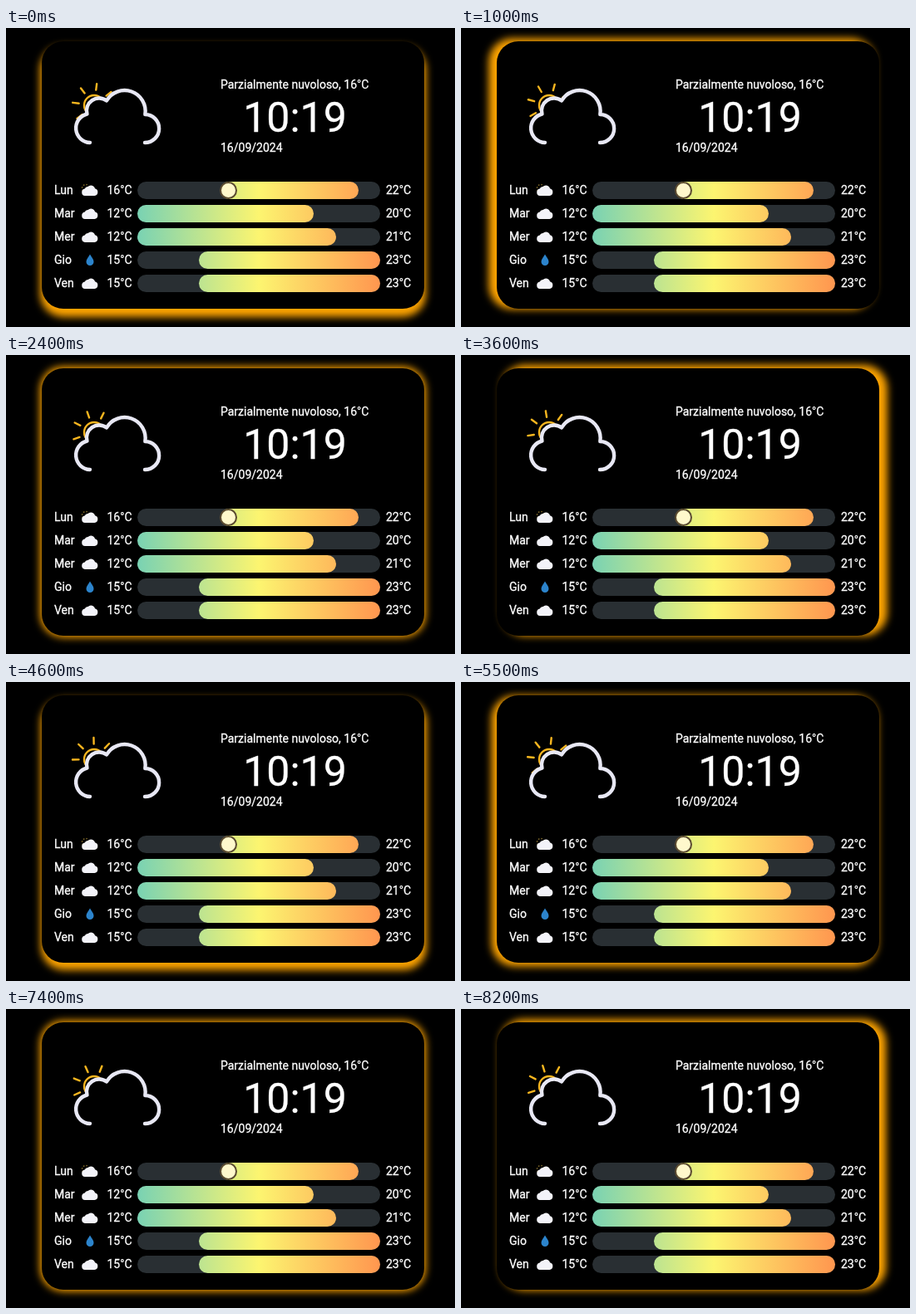
Animation, 540 px wide and 360 px high, one loop 8.3 s. Source, as an HTML page:

```html
<!DOCTYPE html>
<html lang="it">
<head>
<meta charset="utf-8">
<style>
  html, body { margin: 0; width: 100%; height: 100%; overflow: hidden; background: #000; }
  #card { position: absolute; left: 43px; top: 16px; width: 460px; height: 322px; border-radius: 26px; background: #000; }
  svg { position: absolute; left: 0; top: 0; }
  text { font: 14px Roboto, sans-serif; fill: #fff; stroke: #fff; stroke-width: .3px; }
  #clock { font-size: 50px; text-anchor: middle; }
</style>
</head>
<body>
<div id="card"></div>
<svg width="540" height="360" viewBox="0 0 540 360">
  <defs>
    <linearGradient id="heat" gradientUnits="userSpaceOnUse" x1="158" x2="450" y1="0" y2="0">
      <stop offset="0" stop-color="#79d2b3"/>
      <stop offset=".5" stop-color="#fcf570"/>
      <stop offset="1" stop-color="#ff964f"/>
    </linearGradient>
    <path id="cloud" d="M95 202a4.300 4.300 0 0 1-.3-8.500a4 4 0 0 1 4-2.500a5 5 0 0 1 8.300 2.200a4.500 4.500 0 0 1-.5 8.800z" fill="#f3f3f9"/>
    <path id="drop" d="M101 188.500c2 3.500 4.500 6 4.500 9a4.500 4.500 0 0 1-9 0c0-3 2.500-5.500 4.500-9z" fill="#2c84cc"/>
  </defs>

  <g fill="none" stroke="#f8b61f" stroke-width="2.400" stroke-linecap="round">
    <circle cx="106" cy="93" r="12"/>
    <g id="rays"></g>
  </g>
  <path d="M101 138A17.500 17.500 0 0 1 97.500 103.500A15 15 0 0 1 121 87.500A25 25 0 0 1 167.300 104A17 17 0 0 1 167 138"
        fill="#000" stroke="#e8e8f4" stroke-width="4.400" stroke-linecap="round" stroke-linejoin="round"/>

  <text x="258" y="73">Parzialmente nuvoloso, 16°C</text>
  <text id="clock" x="347.500" y="124.500">10:19</text>
  <text x="258" y="149">16/09/2024</text>
  <g id="days"></g>
  <circle cx="267.500" cy="195.500" r="9.500" fill="#fff8cc" stroke="#5a4a30" stroke-width="2"/>
</svg>
<script>
  const LOOP = 8300, STEP = 100, GLOW_CYCLE = 5000, GLOW_START = 2600;
  const $ = id => document.getElementById(id);

  // day, icon, low, high, bar start, bar end
  const days = [
    ['Lun', 'cloud', 16, 22, 258, 424],
    ['Mar', 'cloud', 12, 20, 158, 370],
    ['Mer', 'cloud', 12, 21, 158, 397],
    ['Gio', 'drop', 15, 23, 232, 450],
    ['Ven', 'cloud', 15, 23, 232, 450]
  ];
  const bar = (from, to, fill) =>
    `<rect x="${from}" y="185" width="${to - from}" height="21" rx="10.5" fill="${fill}"/>`;

  $('days').innerHTML = days.map(([name, icon, low, high, from, to], i) => `
    <g transform="translate(0 ${i * 28})">
      <text x="58" y="200">${name}</text>
      ${i ? '' : '<circle cx="96" cy="193" r="4.5" fill="none" stroke="#806a2a" stroke-width="1.5" stroke-dasharray="1.5 2"/>'}
      <use href="#${icon}"/>
      <text x="121.500" y="200">${low}°C</text>
      ${bar(158, 450, '#292f33')}${bar(from, to, 'url(#heat)')}
      <text x="457" y="200">${high}°C</text>
    </g>`).join('');

  $('rays').innerHTML = Array.from({ length: 8 }, (_, i) =>
    `<path d="M106 74.500V67" transform="rotate(${i * 45} 106 93)"/>`).join('');

  // The glow swings centre, right, down, left and back, easing into each stop.
  const stops = [[0, 0], [8, -2], [0, 8], [-8, -2], [0, 0]];
  const glow = $('card').animate(
    stops.map(([x, y]) => ({ boxShadow: `${x}px ${y}px 10px 2px orange`, easing: 'ease' })),
    { duration: GLOW_CYCLE, iterations: Infinity });
  glow.pause();

  function draw(now) {
    const t = Math.floor(now % LOOP / STEP) * STEP;
    glow.currentTime = t - GLOW_START + GLOW_CYCLE;
    $('rays').setAttribute('transform', `rotate(${7 + t * .008} 106 93)`);
  }

  const start = performance.now();
  function tick() {
    draw(performance.now() - start);
    requestAnimationFrame(tick);
  }
  tick();
</script>
</body>
</html>
```
